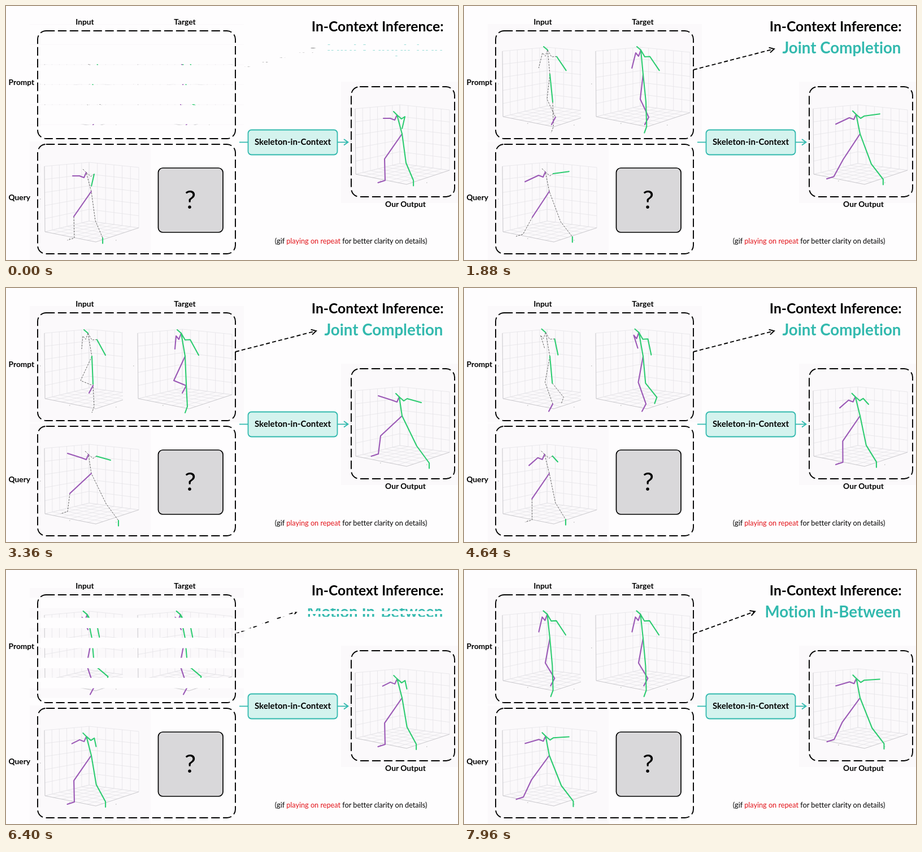
An HTML page that plays this animation: 800 by 450 pixels, repeating every 8 s.

```html
<!DOCTYPE html>
<html lang="en">
<head>
<meta charset="utf-8">
<title>In-Context Inference</title>
<style>
  html, body { margin: 0; width: 100%; height: 100%; overflow: hidden; background: #fefdfe; }
  svg { display: block; width: 800px; height: 450px; }
  text { font: bold 13.8px Lato, sans-serif; font-variant-ligatures: none; fill: #000; }
  .mid { text-anchor: middle; }
  .end { text-anchor: end; }
  .panel { fill: #fbf9fb; }
  .frame { fill: none; stroke: #000; stroke-width: 1.9; stroke-dasharray: 15.2 5.7; }
  .grid { fill: none; stroke: #e5e4e7; stroke-width: .8; }
  .axes { fill: none; stroke: #c6c5c8; stroke-width: .8; }
  .teal { fill: none; stroke: #32b9ae; stroke-width: 1.8; }
  .bone { fill: none; stroke-width: 2.1; stroke-linejoin: round; stroke-linecap: round; }
  .green { stroke: #2ecc71; }
  .purple { stroke: #9b59b6; }
  .missing { stroke: #666; stroke-width: 1; stroke-dasharray: 3.2 1.8; stroke-linecap: butt; }
  .arrow { fill: none; stroke: #000; stroke-width: 1.9; }
</style>
</head>
<body>
<svg viewBox="0 0 800 450">
  <defs>
    <g id="plot">
      <path id="grid" class="grid"/>
      <path class="axes" d="M68 80L69 196L159 214L235 189"/>
      <path d="M112 208h1.5M194 211h1.5M60 138h1.5" stroke="#aaa"/>
    </g>
    <clipPath id="inputArea"><rect x="42" y="32" width="165" height="206"/></clipPath>
    <clipPath id="promptBlinds"><path/></clipPath>
    <clipPath id="arrowBlinds"><path/></clipPath>
    <clipPath id="taskBlinds"><path/></clipPath>
  </defs>

  <rect class="panel" x="42" y="240" width="214" height="210"/>
  <rect class="panel" x="593" y="134" width="207" height="215"/>
  <use href="#plot" y="204"/>
  <use href="#plot" x="550" y="102"/>

  <g clip-path="url(#promptBlinds)">
    <rect class="panel" x="42" y="32" width="379" height="206"/>
    <g clip-path="url(#inputArea)"><use href="#plot"/></g>
    <use href="#plot" x="165"/>
    <g id="promptInput"></g>
    <g id="promptTarget" transform="translate(165 0)"></g>
  </g>
  <g id="queryInput"></g>
  <g id="output" transform="translate(550 -102)"></g>

  <rect class="frame" x="56" y="44" width="350" height="191" rx="15"/>
  <rect class="frame" x="56" y="245" width="350" height="194" rx="15"/>
  <rect class="frame" x="611" y="143" width="183" height="195" rx="15"/>

  <rect x="269.5" y="287" width="114.5" height="114" rx="8" fill="#d9d8da" stroke="#000" stroke-width="1.7"/>
  <text class="mid" x="326" y="358.5" style="font-size:45px;font-weight:400">?</text>

  <path class="teal" d="M413 241.3H428M587 241.3H605M598 236L605.5 241.3L598 246.6"/>
  <rect class="teal" x="428.5" y="219.5" width="158" height="44" rx="6" style="fill:#d4f3ee"/>
  <text class="mid" x="507.5" y="246.3" style="font-size:15px">Skeleton-in-Context</text>

  <text class="mid" x="139.5" y="33">Input</text>
  <text class="mid" x="316.5" y="33">Target</text>
  <text x="4.5" y="139.5">Prompt</text>
  <text x="4.5" y="343.7">Query</text>
  <text class="mid" x="707" y="355.7">Our Output</text>
  <text class="end" x="774.5" y="45" style="font-size:24.65px">In-Context Inference:</text>
  <text class="mid" x="610.5" y="420.5" style="font-size:12.7px;font-weight:400">(gif <tspan fill="#e3151b">playing on repeat</tspan> for better clarity on details)</text>

  <g clip-path="url(#arrowBlinds)">
    <path id="shaft" class="arrow" stroke-dasharray="7 4.2"/>
    <path id="arrowhead" class="arrow" d="M-8.5 -4.7L0 0L-8.5 4.7"/>
  </g>
  <g clip-path="url(#taskBlinds)">
    <text id="task" class="end" x="773.5" y="83.7" style="font-size:27.7px;fill:#32b9ae"></text>
  </g>
</svg>
<script>
const $ = selector => document.querySelector(selector);
const LOOP = 8000, REPLAY = 3480, SLIDE_CHANGE = 5720, BLINDS_MS = 500;
const mix = (a, b, k) => a.map((v, i) => v + (b[i] - v) * k);
const add = (p, x, y) => [p[0] + x, p[1] + y];
const progress = (t, from, to) => Math.min(1, Math.max(0, (t - from) / (to - from)));

// Wall and floor grids of the 3D axes
function mesh(a, b, c, d, columns, rows) {
  let path = '';
  for (let i = 0; i <= columns; i++) path += `M${mix(a, b, i / columns)}L${mix(d, c, i / columns)}`;
  for (let i = 0; i <= rows; i++) path += `M${mix(a, d, i / rows)}L${mix(b, c, i / rows)}`;
  return path;
}
const topLeft = [68, 80], topBack = [147, 73], topRight = [235, 82];
const left = [69, 196], back = [147, 177], right = [235, 189], front = [159, 214];
$('#grid').setAttribute('d',
  mesh(topLeft, topBack, back, left, 6, 5) +
  mesh(topBack, topRight, right, back, 6, 5) +
  mesh(left, back, right, front, 6, 6));

// A walk goes from gathered through stride to lifted; pace bends the first half (1 is even)
function walk(s) {
  const step = progress(s, 600, 2500), lift = progress(s, 2500, 3960);
  const move = (gathered, stride, lifted, pace = 1) =>
    lift ? mix(stride, lifted, lift) : mix(gathered, stride, step ** pace);
  return { step, move };
}

// Joints: H head, N neck, P pelvis, abc purple arm, def green arm, ghi purple leg, jkl green leg
function queryJoints(s) {
  const { step, move } = walk(s);
  const N = move([142, 295], [144, 294], [146, 295]);
  const h = move([121, 411], [104, 404], [109, 396], 3);
  const k = move([171, 411], [192, 409], [199, 412], .7);
  return {
    N, H: add(N, -6, -6), P: [151, 328.5],
    a: add(N, -4, 9), b: add(N, -12, 6),
    c: add(move([118, 301], [108, 311], [109, 293]), 0, 13 * Math.sin(Math.PI * step)),
    d: add(N, 8, 7), e: add(N, 14, 3),
    f: move([151, 319], [186, 293], [185, 305], .7),
    g: move([120, 373], [121, 374], [113, 364]), h, i: add(h, -12.5, 4),
    j: move([158, 380], [171, 382], [177, 382]), k, l: add(k, 0, 9.5)
  };
}

function promptJoints(s) {
  const { move } = walk(s);
  const N = move([143, 79], [148, 78], [145, 80]);
  const h = move([155, 209], [162, 197], [154, 173]);
  const k = move([184, 185], [158, 214], [156, 210]);
  return {
    N, H: add(N, -7, -6), P: [152, 121],
    a: add(N, -4, 11), b: add(N, -9, 5),
    c: move([147, 105], [132, 110], [134, 108]),
    d: add(N, 7, 12), e: add(N, 16, 11.5),
    f: move([165, 119], [181, 114], [176, 119], 2),
    g: move([142, 168], [147, 165], [132, 164]), h, i: add(h, -7, 13),
    j: move([156, 168], [157, 170], [154, 170]), k, l: add(k, -4, 11)
  };
}

const full = { green: 'HNPjkl Ndef', purple: 'Nabc Pghi' };
const queryMasked = { missing: 'HNPjk Nde Pg ghi', green: 'ef kl', purple: 'Nabc Pg' };
const promptMasked = { missing: 'NP Nabc Nde Pghi jkl', green: 'HN ef Pj', purple: 'hi' };
const colours = ['missing', 'purple', 'green'];

const chains = (joints, spec) => spec && spec.split(' ')
  .map(chain => 'M' + [...chain].map(name => joints[name].map(v => v.toFixed(2))).join('L')).join('');

for (const id of ['promptInput', 'promptTarget', 'queryInput', 'output'])
  $('#' + id).innerHTML = colours.map(c => `<path class="bone ${c}"/>`).join('');

function drawFigure(id, joints, style) {
  for (const colour of colours)
    $(`#${id} .${colour}`).setAttribute('d', chains(joints, style[colour] || ''));
}

// Six horizontal slats opening downwards
function setBlinds(id, top, height, open) {
  const slat = height / 6;
  let path = '';
  for (let i = 0; open > 0 && i < 6; i++)
    path += `M0 ${top + i * slat}h800v${slat * Math.min(1, open)}h-800z`;
  $(`#${id} path`).setAttribute('d', path);
}

function clipTime(t) {
  if (t < REPLAY) return Math.min(t, 3360) + 600;
  if (t < SLIDE_CHANGE) return Math.min(t, 5560) - REPLAY;
  return (t - SLIDE_CHANGE) * 1.25;
}

function setTask(name, x, y) {
  const startX = 406, startY = 113;
  const angle = Math.atan2(y - startY, x - startX) * 180 / Math.PI;
  $('#task').textContent = name;
  $('#shaft').setAttribute('d', `M${startX} ${startY}L${x - 2} ${y + .6}`);
  $('#arrowhead').setAttribute('transform', `translate(${x} ${y}) rotate(${angle})`);
}

function draw(t) {
  const second = t >= SLIDE_CHANGE;
  const s = clipTime(t);
  const query = queryJoints(s), prompt = promptJoints(s);
  drawFigure('queryInput', query, second ? full : queryMasked);
  drawFigure('output', query, full);
  drawFigure('promptInput', prompt, second ? full : promptMasked);
  drawFigure('promptTarget', prompt, full);

  if (second) setTask('Motion In-Between', 515, 73.5);
  else setTask('Joint Completion', 549, 76);

  const open = (t - (second ? 6160 : -20)) / BLINDS_MS;
  setBlinds('promptBlinds', 32, 213, open);
  setBlinds('arrowBlinds', 66, 50, open);
  setBlinds('taskBlinds', 48, 60, open);
}

const start = performance.now();
function tick() {
  draw((performance.now() - start) % LOOP);
  requestAnimationFrame(tick);
}
tick();
</script>
</body>
</html>
```
